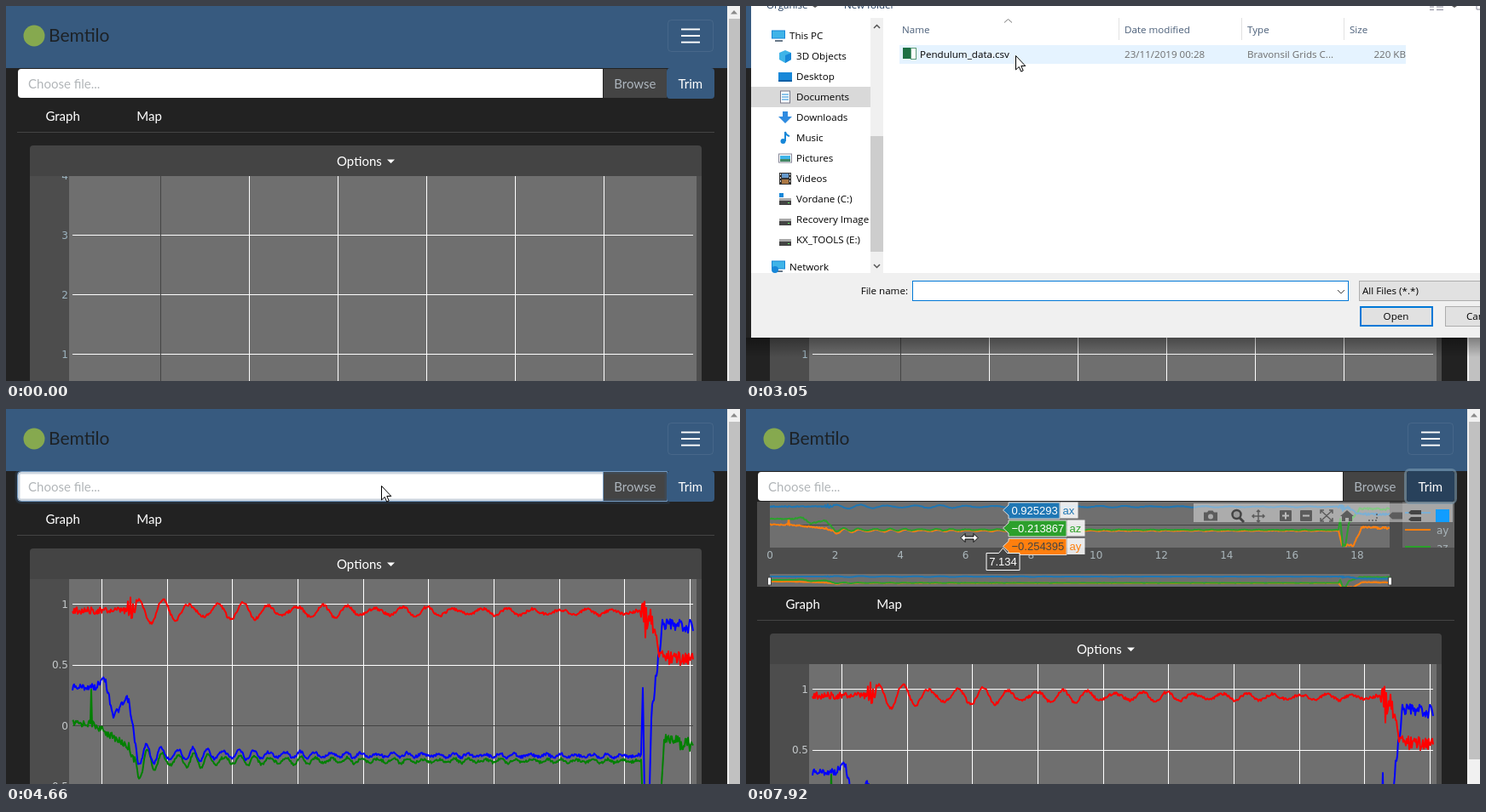
An HTML page for the animation above (8000 ms loop, 861x441 px).

```html
<!DOCTYPE html>
<html lang="en">
<head>
<meta charset="utf-8">
<title>Sensor graph: load and trim</title>
<style>
  html, body { margin: 0; width: 100%; height: 100%; overflow: hidden; background: #222; }
  svg { display: block; width: 861px; height: 441px; }
  text { font: 15px Lato, sans-serif; fill: #fff; white-space: pre; }
  .brand { font-size: 21px; fill: #1d2226; }
  .tick { font: 12px "DejaVu Sans", sans-serif; }
  .win { font: 11.6px "Open Sans", sans-serif; fill: #000; }
  .hover { font: 13px "Liberation Sans", Arial, sans-serif; }
  .end { text-anchor: end; }
  .mid { text-anchor: middle; }
</style>
</head>
<body>
<svg id="stage" viewBox="0 0 861 441"></svg>
<script>
const LOOP = 8000;
// The screen refreshes at this steady pace after a short rest.
const REST = 385, STEP = 203.5;

const range = (n, fn) => Array.from({ length: n }, (_, i) => fn(i)).join('');
const rect = (x, y, w, h, fill, extra = '') =>
  `<rect x="${x}" y="${y}" width="${w}" height="${h}" fill="${fill}" ${extra}/>`;
const circle = (x, y, r, fill, extra = '') => `<circle cx="${x}" cy="${y}" r="${r}" fill="${fill}" ${extra}/>`;
const path = (d, stroke, width = 1, extra = '') =>
  `<path d="${d}" fill="none" stroke="${stroke}" stroke-width="${width}" ${extra}/>`;
const shape = (d, fill, extra = '') => `<path d="${d}" fill="${fill}" ${extra}/>`;
const text = (x, y, s, cls = '', fill = '') =>
  `<text x="${x}" y="${y}" class="${cls}" ${fill && `style="fill:${fill}"`}>${s}</text>`;
const group = (id, content, extra = '') => `<g id="${id}" ${extra}>${content}</g>`;

const smooth = k => k * k * (3 - 2 * k);
const clamp = k => Math.min(1, Math.max(0, k));
const noise = (i, seed) => {
  const n = Math.sin(i * 12.9898 + seed * 78.233) * 43758.5453;
  return (n - Math.floor(n)) * 2 - 1;
};

// Interpolates [key, ...values] rows.
function along(rows, key, ease = k => k) {
  const next = rows.findIndex(r => r[0] > key);
  if (next < 0) return rows[rows.length - 1].slice(1);
  if (next === 0) return rows[0].slice(1);
  const a = rows[next - 1], b = rows[next];
  const k = ease((key - a[0]) / (b[0] - a[0]));
  return a.slice(1).map((v, i) => v + (b[i + 1] - v) * k);
}

// Pendulum signals: a rough course, a decaying swing between release and stop, and jolts at both.
const ZERO = 372.5, LEFT = 78, RIGHT = 806, RELEASE = 146, STOP = 750;
const SIGNALS = {
  ay: { main: '#008000', trim: '#ff7f0e', swing: 13, decay: 120, period: 18, peak: 166, jolt: 4,
    course: [[99, 370], [100, 332], [101, 370], [145, 398], [155, 424], [163, 413], [745, 414],
      [749, 520], [763, 520], [772, 390], [806, 395]] },
  az: { main: '#0000ff', trim: '#2ca02c', swing: 12, decay: 120, period: 18, peak: 165, jolt: 4,
    course: [[106, 327], [115, 313], [126, 361], [143, 340], [154, 406], [745, 408], [747, 328],
      [750, 520], [753, 520], [757, 360], [770, 255], [806, 256]] },
  ax: { main: '#ff0000', trim: '#1f77b4', swing: 14, decay: 260, period: 31, peak: 278, jolt: 26,
    course: [[78, 237], [755, 239], [768, 292], [806, 294]] }
};

function level(signal, x, seed) {
  const swinging = x > RELEASE + 6 && x < STOP - 5;
  const jolt = signal.jolt * Math.exp(-Math.min(Math.abs(x - RELEASE), Math.abs(x - STOP)) / 2.5);
  const grain = swinging ? 1.6 : x > STOP ? 8 : 4;
  let y = along(signal.course, x)[0] + noise(x, seed) * (grain + jolt);
  if (swinging) {
    const phase = (x - signal.peak) / signal.period * 2 * Math.PI;
    const size = 2 + signal.swing * Math.exp((RELEASE - x) / signal.decay);
    y -= size * (0.75 * Math.cos(phase) + 0.25 * Math.cos(phase * 1.3));
  }
  return y;
}
Object.values(SIGNALS).forEach((s, seed) => {
  s.points = Array.from({ length: RIGHT - LEFT + 1 }, (_, i) => [LEFT + i, level(s, LEFT + i, seed)]);
});
const curves = (palette, dx, zero, scale) => Object.values(SIGNALS).map(s =>
  path('M' + s.points.map(([x, y]) => (x + dx) + ' ' + (zero + (y - ZERO) * scale).toFixed(1)).join('L'),
    s[palette], 2, 'stroke-linejoin="round"')).join('');

function navbar() {
  return rect(0, 0, 846, 73, '#375a7f') +
    circle(33, 35, 12.5, '#86a94f') + text(50, 42, 'Bemtilo', 'brand') +
    rect(776.5, 16.5, 53, 37, 'none', 'rx="4" stroke="#fff" stroke-opacity=".08"') +
    range(3, i => rect(792, 26.5 + i * 7.6, 22, 1.9, '#fff'));
}

function fileRow() {
  const outline = 'M775.5 73.5H17.5a4 4 0 0 0-4 4V104.5a4 4 0 0 0 4 4H775.5z';
  return shape('M700 74H18a4 4 0 0 0-4 4V104a4 4 0 0 0 4 4H700z', '#fff') +
    text(26, 97, 'Choose file...', '', '#b2b6b9') +
    rect(701, 74, 74, 34, '#444') + text(713.3, 97, 'Browse', '', '#adb5bd') +
    group('focus', path(outline, '#375a7f', 6, 'opacity=".25"') + path(outline + 'M700.5 74v34', '#739ac2')) +
    rect(773.5, 71.5, 59, 39, 'none', 'id="trimGlow" rx="5" stroke="#7b9ab0" stroke-opacity=".6" stroke-width="3"') +
    rect(775, 73, 56, 36, '#375a7f', 'id="trimButton" rx="4"') + text(788.6, 97, 'Trim');
}

function graph() {
  const empty = path(range(5, i => `M${285.5 + i * 104} 200V441`) + range(3, i => `M78 ${269.5 + i * 70}H806`), '#fff') +
    path('M181.5 200V441', '#444') +
    range(4, i => text(73, 204 + i * 70, 4 - i, 'tick end', '#9db4c0'));
  const loaded = path(range(10, i => `M${Math.round(112 + i * 76.67) + 0.5} 200V441`) + 'M78 229.5H806M78 301.5H806', '#fff') +
    path('M78 372.5H806', '#444') +
    ['1', '0.5', '0', '−0.5'].map((s, i) => text(73, 234 + i * 71.3, s, 'tick end', '#c4c8ca')).join('') +
    curves('main', 0, ZERO, 1);
  return text(46.4, 135, 'Graph') + text(153.3, 135, 'Map') + path('M13 148.5H831', '#444') +
    rect(28, 198, 788, 260, '#4d4d4d') + rect(74, 198, 736, 260, '#6f6f6f') +
    group('empty', empty) + group('loaded', loaded) +
    shape('M28 200V168a4 4 0 0 1 4-4H812a4 4 0 0 1 4 4V200z', '#444') +
    text(388, 188, 'Options') + shape('M447 180.5h9l-4.5 4.5z', '#fff');
}

function modebar() {
  const dark = '#5c5c5c';
  const box = x => rect(x - 7, 119, 14, 13, dark, 'rx="1"') + path(`M${x - 4} 125.5h8`, '#bbb', 2);
  const tag = x => shape(`M${x - 9} 125.5l4-4h12v8h-12z`, dark);
  return rect(525, 111, 304, 22, '#fff', 'opacity=".42"') +
    shape('M537 121.5h4l1.5-2h5l1.5 2h4v10h-16z', dark) + circle(545, 126.5, 3, '#aaa') +
    circle(575.5, 124, 5, '#999', 'stroke="#444" stroke-width="2.5"') + path('M579 128l5 5', '#444', 3) +
    path('M601 119v14M594 126h14M599 121l2-2 2 2M599 131l2 2 2-2M596 124l-2 2 2 2M606 124l2 2-2 2', dark, 1.5) +
    box(633) + path('M633 121.5v8', '#bbb', 2) + box(657) +
    path('M674 123v-4h4M684 119h4v4M688 128v4h-4M678 132h-4v-4M675 120l12 11M687 120l-12 11', dark, 1.5) +
    shape('M697 126l8-7 8 7h-2v6h-4v-4h-4v4h-4v-6z', dark) +
    path('M730 131h10v-10', dark, 1.5, 'stroke-dasharray="2 2"') +
    tag(763) + shape('M777 122l3-3h12v5h-12zM777 130l3-3h12v5h-12z', '#444') +
    rect(809, 118, 16, 15, '#119dff');
}

function trimPanel() {
  const handle = x => rect(x - 2, 198, 4, 9, '#fff', 'stroke="#444"');
  const legend = (name, i) => path(`M773 ${122 + i * 20}h30`, SIGNALS[name].trim, 2) +
    text(810, 126.5 + i * 20, name, 'tick', '#a9b5ba');
  return rect(13, 109, 818, 100, '#4d4d4d') + rect(28, 109, 727, 54, '#6f6f6f') + path('M28 136.5H755', '#444') +
    group('', curves('trim', -50, 136.5, 0.161), 'clip-path="url(#trimPlot)"') +
    range(10, i => text(28 + i * 76.55, 176, i * 2, 'tick mid', '#aab6bb')) +
    rect(28, 194, 727, 15, '#6f6f6f') + curves('trim', -50, 203, 0.044) + handle(27.5) + handle(755.5) +
    group('', rect(770, 109, 61, 54, '#666') + ['ax', 'ay', 'az'].map(legend).join(''), 'clip-path="url(#legendBox)"') +
    group('modebar', modebar()) + group('readout', readout(301.5));
}

// One flag per signal, plus the time label under the plot.
function readout(x) {
  const flag = (name, value, y, ink) => {
    const fill = SIGNALS[name].trim, w = value.startsWith('−') ? 68 : 60;
    return rect(x + 7 + w, y, 21, 19, '#fff', 'opacity=".86"') + text(x + 10 + w, y + 14, name, 'hover', fill) +
      shape(`M${x} ${y + 9.5}l6.5-6V${y + 0.5}h${w}v19h${-w}v-4z`, fill, 'stroke="#ddd"') +
      text(x + 10, y + 14, value, 'hover', ink);
  };
  return flag('ax', '0.925293', 109.5, '#fff') + flag('az', '−0.213867', 130.5, '#fff') +
    flag('ay', '−0.254395', 152, '#444') +
    shape(`M${x} 163.5l5 6h14.5v20h-39v-20h14.5z`, '#444', 'stroke="#fff"') + text(x, 184, '7.134', 'hover mid');
}

function loader() {
  const ring = (id, r, color) =>
    group(id, group('', circle(422, 319, r, 'none', `stroke="${color}" stroke-width="3"`), 'mask="url(#fade)"'));
  return rect(0, 0, 846, 441, '#000', 'opacity=".5"') + ring('ring0', 75, '#8d4f62') +
    ring('ring1', 70, '#a6963f') + ring('ring2', 60.5, '#6292b3') +
    '<text id="percent" x="422" y="335" class="mid" style="fill:#ccc"></text>';
}

function sidebar() {
  const blue = '#1787d8', sky = '#3fb4e8';
  const drive = y => rect(39, y - 1, 14, 3, '#aaa') + rect(39, y + 2, 14, 5, '#444') + rect(49, y + 4, 2, 1, '#6f6');
  const monitor = y => rect(30.5, y - 6, 15, 9, sky, `stroke="${blue}"`) + path(`M34 ${y + 6}h9`, '#678', 2);
  const items = {
    'This PC': monitor,
    '3D Objects': y => shape(`M39 ${y - 4}l7-3 7 3v8l-7 4-7-4z`, sky) + shape(`M46 ${y - 1}l7-3v8l-7 4z`, blue),
    'Desktop': y => rect(38, y - 5, 16, 11, blue) + rect(38, y + 4, 16, 2, '#0b5fa5'),
    'Documents': y => rect(40.5, y - 7, 11, 14, '#fff', 'stroke="#778"') +
      path(`M42 ${y - 3}h8M42 ${y}h8M42 ${y + 3}h8`, blue),
    'Downloads': y => shape(`M43 ${y - 7}h6v6h5l-8 8-8-8h5z`, '#2f8be0'),
    'Music': y => path(`M46 ${y + 4}v-11q1 4 5 5`, blue, 2) + circle(43.5, y + 4, 3, blue),
    'Pictures': y => rect(38.5, y - 5, 15, 10, '#fff', 'stroke="#889"') +
      rect(40, y - 3, 12, 4, sky) + rect(40, y + 1, 12, 3, '#486'),
    'Videos': y => rect(39, y - 7, 14, 14, '#333') + rect(42, y - 6, 8, 5, '#69c') + rect(42, y + 1, 8, 5, '#a74') +
      path(`M40.5 ${y - 6}v12M51.5 ${y - 6}v12`, '#ddd', 1, 'stroke-dasharray="2 2"'),
    'Vordane (C:)': y => drive(y) + rect(39, y - 7, 5, 5, blue),
    'Recovery Image': drive,
    'KX_TOOLS (E:)': drive,
    'Network': y => monitor(y - 1) + circle(34, y + 3, 4, blue)
  };
  return rect(6, 95, 140, 24, '#d9d9d9') + Object.entries(items).map(([name, icon], i) => {
    const y = 35 + i * 24 + (i === 11 ? 8 : 0);
    return icon(y) + text(i % 11 ? 59 : 51, y + 4, name, 'win');
  }).join('') +
    rect(146, 14, 15, 300, '#f0f0f0') + rect(146, 153, 15, 136, '#cdcdcd') +
    path('M150 26l3.5-3.5 3.5 3.5M150 304l3.5 3.5 3.5-3.5', '#555', 1.5);
}

function dialog() {
  const grey = '#6d6d6d', navy = '#1e395b';
  const head = (x, s) => text(x, 32, s, 'win', '#4c607a');
  return rect(0, 390, 861, 23, 'url(#shadow)') + rect(6, 0, 855, 390, '#fff') +
    text(24, 3, 'Organise', 'win', navy) + text(115, 3, 'New folder', 'win', navy) +
    shape('M78 0h6l-3 2zM828 0h6l-3 2z', '#555') + path('M802 1h5M810 1h8M802 4.5h5M810 4.5h8M857 0v4h4', '#889') +
    sidebar() + path('M437.5 14v26M581.5 14v26M701.5 14v26', '#e2e2e2') + path('M303 19.5l4.5-4 4.5 4', '#777') +
    head(183, 'Name') + head(444, 'Date modified') + head(588, 'Type') + head(708, 'Size') +
    rect(180, 46, 594, 22, '#e5f3ff', 'id="rowHover"') +
    rect(184, 49, 13, 13, '#1d7044') + rect(193.5, 49.5, 6, 13, '#fff', 'stroke="#5a9a76"') +
    text(204, 61, 'Pendulum_data.csv', 'win') + text(444, 61, '23/11/2019 00:28', 'win', grey) +
    text(588, 61, 'Bravonsil Grids C...', 'win', grey) + text(774, 61, '220 KB', 'win end', grey) +
    rect(6, 314, 855, 76, '#f0f0f0') + text(190, 339, 'File name:', 'win end') +
    rect(195.5, 323.5, 511, 23, '#fff', 'stroke="#0078d7"') + path('M694 334l4 4 4-4', '#444') +
    rect(719.5, 323.5, 160, 23, '#e1e1e1', 'stroke="#adadad"') + text(723, 339, 'All Files (*.*)', 'win') +
    rect(721, 354, 84, 22, '#e1e1e1', 'stroke="#0078d7" stroke-width="2"') + text(762.5, 369, 'Open', 'win mid') +
    rect(820.5, 353.5, 85, 23, '#e1e1e1', 'stroke="#adadad"') + text(845, 369, 'Cancel', 'win');
}

document.getElementById('stage').innerHTML = `<defs>
  <clipPath id="panelClip"><rect id="panelHeight" x="13" y="109" width="818" height="0"/></clipPath>
  <clipPath id="trimPlot"><rect x="28" y="109" width="727" height="54"/></clipPath>
  <clipPath id="legendBox"><rect x="770" y="109" width="61" height="54"/></clipPath>
  <linearGradient id="fadeFill" x2="0" y2="1"><stop offset=".2" stop-color="#000"/><stop offset=".82" stop-color="#fff"/></linearGradient>
  <mask id="fade" maskUnits="userSpaceOnUse" x="342" y="239" width="160" height="160">
    <rect x="342" y="239" width="160" height="160" fill="url(#fadeFill)"/></mask>
  <linearGradient id="shadow" x2="0" y2="1"><stop stop-opacity=".35"/><stop offset="1" stop-opacity="0"/></linearGradient>
</defs>` +
  rect(0, 0, 861, 441, '#222') + navbar() + group('below', graph()) +
  group('panel', trimPanel(), 'clip-path="url(#panelClip)"') + fileRow() +
  group('loader', loader()) +
  rect(846, 0, 15, 441, '#f1f1f1') + rect(848, 15, 13, 426, '#c1c1c1', 'id="thumb"') + shape('M850 9.5h8l-4-4.5z', '#8a8a8a') +
  group('dialog', dialog()) +
  shape('M0 0V16.5L3.8 13 6.2 18.6 8.7 17.5 6.3 12H11.3Z', '#fff', 'id="arrow" stroke="#000"') +
  shape('M-10 0l5-5v3.5h10v-3.5l5 5-5 5v-3.5h-10v3.5z', '#fff', 'id="resize" stroke="#000"');

// Where the pointer rests: browse, file row, page, trim button, trim plot.
const POINTER = [[385, 795, 338], [1800, 727.5, 84.5], [2240, 727.5, 84.5], [3020, 316.5, 58.5], [3840, 305.5, 57.5],
  [4650, 440.5, 90.5], [5080, 440.5, 90.5], [6080, 776.5, 108.5], [6280, 795.5, 94.5], [7320, 795.5, 94.5], [7900, 262, 151.5]];

const $ = id => document.getElementById(id);
const show = (id, on) => { $(id).style.display = on ? '' : 'none'; };

function render(t) {
  const between = (from, to = LOOP) => t >= from && t < to;
  const opened = 100 * smooth(clamp((t - 6450) / 400));
  $('below').setAttribute('transform', `translate(0 ${opened})`);
  $('panelHeight').setAttribute('height', opened);
  $('thumb').setAttribute('height', 447 - opened * 0.5);

  show('empty', between(0, 4600));
  show('loaded', between(4600));
  show('focus', between(3400, 6450));
  show('trimGlow', between(6450));
  $('trimButton').setAttribute('fill', between(6250) ? '#28415b' : '#375a7f');

  show('dialog', between(2200, 3400));
  show('rowHover', between(2800));
  show('loader', between(3800, 4600));
  $('percent').textContent = `Loading: ${Math.round(7 + (t - 3844) * 0.14)}%`;
  [2000, 3000, 1500].forEach((turn, i) =>
    $('ring' + i).setAttribute('transform', `rotate(${(t - 3844) / turn * 360} 422 319)`));

  show('modebar', between(7480));
  show('readout', between(7880));

  const at = `translate(${along(POINTER, t, smooth).join(' ')})`;
  $('arrow').setAttribute('transform', at);
  $('resize').setAttribute('transform', at);
  show('arrow', between(REST, 7680));
  show('resize', between(7680));
}

let shown = -1;
function frame() {
  const now = performance.now() % LOOP;
  const tick = now < REST ? 0 : REST + Math.floor((now - REST) / STEP) * STEP;
  if (tick !== shown) render(shown = tick);
  requestAnimationFrame(frame);
}
frame();
</script>
</body>
</html>
```
